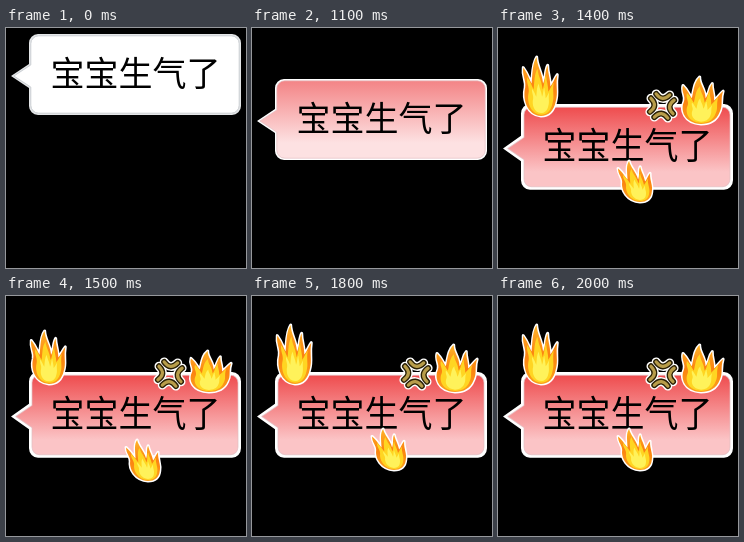
An HTML page with a canvas for the animation above (2100 ms loop, 240 by 240 pixels).

```html
<!DOCTYPE html>
<html lang="zh-CN">
<head>
<meta charset="utf-8">
<style>
html, body { margin: 0; width: 100%; height: 100%; overflow: hidden; background: #000; }
canvas { display: block; width: 240px; height: 240px; }
</style>
</head>
<body>
<canvas id="stage" width="240" height="240"></canvas>
<script>
const ctx = document.getElementById('stage').getContext('2d');
const LOOP = 2100;
const lerp = (a, b, t) => a + (b - a) * t;
const mix = (a, b, t) => 'rgb(' + a.map((v, i) => Math.round(lerp(v, b[i], t))).join() + ')';
const WHITE = [255, 255, 255], RED = [238, 70, 72], PINK = [251, 196, 198];

// Bubble outline, inset by d; the tip is at (0, 42).
function bubblePath(d) {
  const l = 18 + d, r = 230 - d, t = d, b = 81 - d, c = 9 - d * 0.6;
  const p = new Path2D();
  p.moveTo(l + c, t);
  p.arcTo(r, t, r, b, c);
  p.arcTo(r, b, l, b, c);
  p.arcTo(l, b, l, t, c);
  p.lineTo(l, 54 - d * 0.5);
  p.lineTo(d * 1.6, 42);
  p.lineTo(l, 30 + d * 0.5);
  p.arcTo(l, t, r, t, c);
  p.closePath();
  return p;
}

function bubble(y, stretch, heat, rim) {
  ctx.save();
  ctx.translate(5, y);
  ctx.scale(1, stretch);
  ctx.fillStyle = heat ? '#fff' : '#e4e6e8';
  ctx.fill(bubblePath(0));
  const g = ctx.createLinearGradient(0, 0, 0, 80);
  g.addColorStop(0, mix(WHITE, RED, heat));
  g.addColorStop(0.8, mix(WHITE, PINK, Math.max(0, heat - 0.35) / 0.65));
  ctx.fillStyle = g;
  const inner = bubblePath(rim);
  ctx.fill(inner);
  ctx.strokeStyle = heat > 0.5 ? 'rgba(225,190,194,.7)' : '#cbcfd3';
  ctx.lineWidth = 1;
  ctx.stroke(inner);
  ctx.fillStyle = '#000';
  ctx.font = '300 34px "Noto Sans CJK SC", "Noto Sans CJK", sans-serif';
  ctx.fillText('宝宝生气了', 39.5, 51.5);
  ctx.restore();
}

// Five tongues on a round base at (0, 0), one unit tall.
const tongues = new Path2D('M0 0C-.4-.02-.5-.3-.42-.48C-.38-.6-.5-.68-.46-.82' +
  'C-.34-.72-.3-.62-.24-.55C-.2-.75-.2-.9-.08-1C-.08-.85.06-.75.08-.55' +
  'C.16-.65.14-.78.22-.86C.22-.72.28-.66.28-.5C.36-.56.4-.64.48-.7' +
  'C.42-.5.5-.4.42-.25C.36-.08.2 0 0 0Z');

// x, y is the middle of the base.
function flame(x, y, w, h, lean) {
  const layer = (s, fill, rim) => {
    const p = new Path2D();
    p.addPath(tongues, new DOMMatrix([w * s, 0, -lean * w * s, h * s, x, y - h * (1 - s) * 0.1]));
    if (rim) {
      ctx.lineJoin = 'round';
      ctx.lineWidth = 3;
      ctx.strokeStyle = '#fff';
      ctx.stroke(p);
    }
    ctx.fillStyle = fill;
    ctx.fill(p);
  };
  const g = ctx.createLinearGradient(0, y - h, 0, y);
  g.addColorStop(0, '#ffb52a');
  g.addColorStop(0.5, '#fb8210');
  g.addColorStop(1, '#fba01c');
  layer(1, g, true);
  layer(0.78, '#ffd522');
  layer(0.5, '#fff25a');
}

function angerMark(x, y) {
  ctx.save();
  ctx.translate(x, y);
  ctx.rotate(Math.PI / 4 + 0.08);
  ctx.lineCap = 'round';
  for (const [w, c] of [[9, '#fff'], [6, '#2b2106'], [3.2, '#b89d4a']]) {
    ctx.lineWidth = w;
    ctx.strokeStyle = c;
    for (let i = 0; i < 4; i++) {
      ctx.beginPath();
      ctx.moveTo(3.4, 13);
      ctx.quadraticCurveTo(2.6, 2.6, 13, 3.4);
      ctx.stroke();
      ctx.rotate(Math.PI / 2);
    }
  }
  ctx.restore();
}

function sideFlames(k, dip) {
  flame(lerp(59, 43, k), 88, lerp(27, 36, k), lerp(34, 59, k) - dip, -0.04);
  flame(lerp(209, 203, k), lerp(94, 96, k), lerp(28, 43, k), lerp(32, 47, k) - dip, 0.05);
}

function draw(t) {
  const step = t < 1000 ? 0 : Math.floor((t - 1000) / 100) + 1;
  ctx.clearRect(0, 0, 240, 240);
  if (step < 4) {
    bubble([6, 22, 51, 80][step], 1, [0, 0.35, 0.68, 1][step], 1.8);
    if (step === 3) sideFlames(0, 0);
  } else if (step === 4) {
    bubble(78, 1.03, 1, 2.4);
    sideFlames(0.5, 0);
    flame(141, 173, 24, 30, -0.25);
  } else {
    // The flames flicker between two heights.
    const low = step % 2 === 0;
    bubble(76, 1.06, 1, 3);
    angerMark(164, 78);
    sideFlames(1, low ? 6 : 0);
    flame(142, low ? 185 : 174, 33, 41, -0.25);
  }
}

const start = performance.now();
function tick() {
  draw((performance.now() - start) % LOOP);
  requestAnimationFrame(tick);
}
draw(0);
requestAnimationFrame(tick);
</script>
</body>
</html>
```
